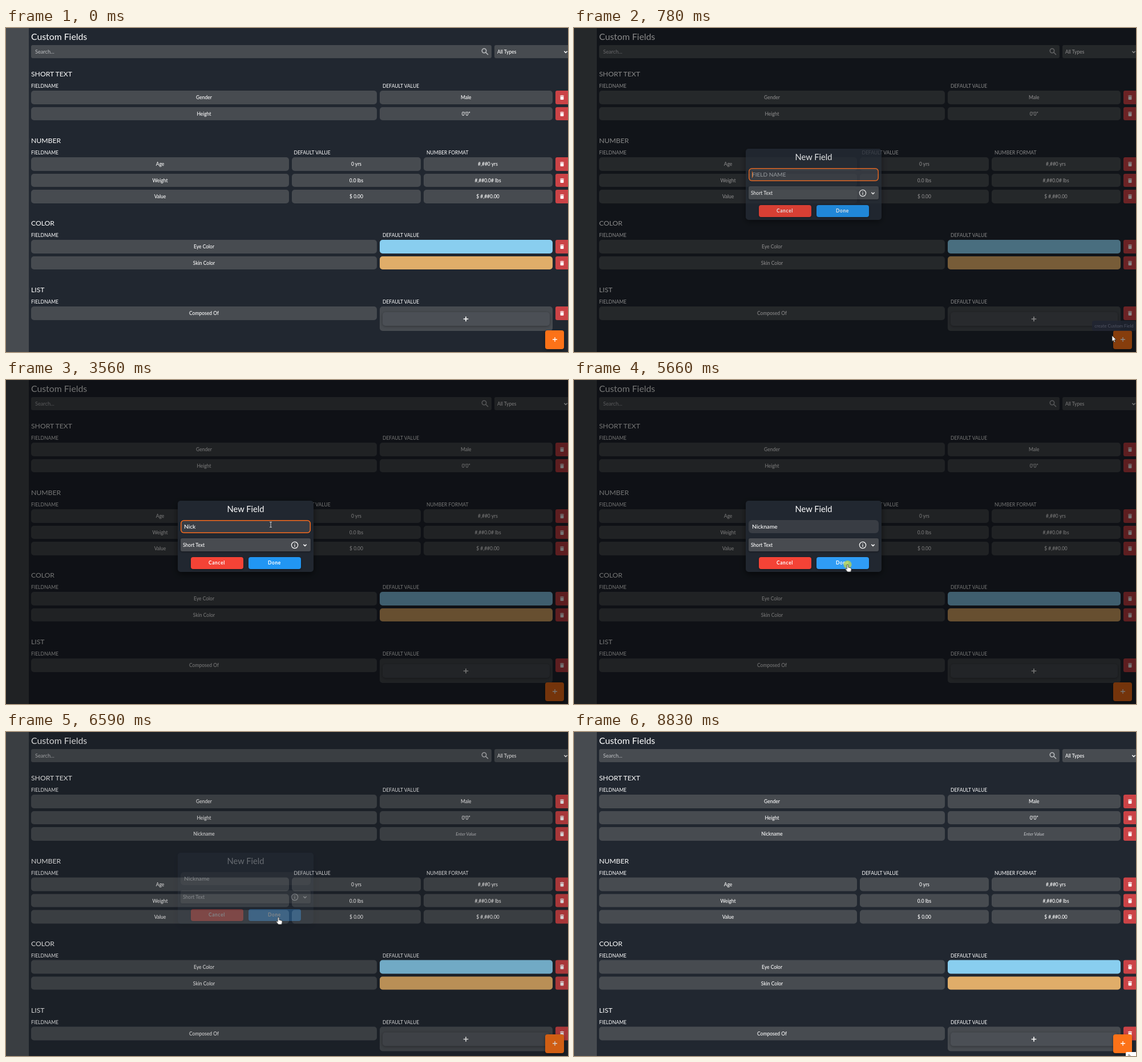
Write an HTML page that moves like this. It is 985 px wide and 569 px high and loops after 8920 ms.

```html
<!DOCTYPE html>
<html lang="en">
<head>
<meta charset="utf-8">
<title>Custom Fields</title>
<style>
  :root { --loop: 8920ms; --bg: #212730; --cell: #474b50; --accent: #fc7218; }
  html, body { margin: 0; width: 100%; height: 100%; overflow: hidden; background: var(--bg); }
  body { font: 500 8.5px Lato, "Open Sans", sans-serif; color: #fff; }
  div, svg { position: absolute; box-sizing: border-box; }
  svg { overflow: visible; fill: none; stroke: #fff; }
  #stage { inset: 0 auto auto 0; width: 985px; height: 569px; overflow: hidden; background: var(--bg); }
  #page, #below, #dialog { inset: 0; }
  .text { line-height: 20px; white-space: pre; }
  .title { font-size: 15.8px; font-weight: 400; }
  .heading { font-size: 12.2px; font-weight: 400; }
  .label { font-weight: 400; }
  .cell, .button, .delete, .center { display: flex; align-items: center; justify-content: center; white-space: pre; }
  .cell { background: var(--cell); border-radius: 5px; }
  .bar { background: var(--cell); border-radius: 3px; }
  .side { background: var(--cell); }
  .delete { background: #cb4346; border-radius: 3px 0 0 3px; }
  .delete svg { position: static; fill: #fff; stroke: none; }
  .empty { font-size: 7.7px; font-style: italic; font-weight: 400; color: #c4c6c9; }
  .add { background: #4b4f55; border-radius: 5px; box-shadow: 0 1px 4px #0005; }
  .fab { background: var(--accent); border-radius: 4px; box-shadow: 0 2px 5px #0006; }
  .tip { background: #3c455e; border-radius: 4px; font-size: 7.8px; font-weight: 400; color: #b0b6d8; }
  .shade { background: #000; opacity: .54; }
  .modal { background: var(--bg); border-radius: 5px; box-shadow: 0 4px 12px #0008; }
  .modal-title { font-size: 14.7px; font-weight: 400; }
  .input { background: #393d44; border-radius: 6px; padding-left: 6px; font-size: 10.1px; line-height: 22px; }
  .placeholder { color: #a6a9ad; font-weight: 400; }
  .caret { display: inline-block; width: 1px; height: 11px; margin-right: -1px; vertical-align: -2px; background: var(--accent); }
  .select { background: #484b50; border-radius: 3px; box-shadow: 0 1px 3px #0006; }
  .button { border-radius: 4px; font-weight: 700; letter-spacing: .6px; box-shadow: 0 1px 3px #0006; }
  .cancel { background: #f44336; }
  .done { background: #2196f3; }
  .corner { background: #fff; border-radius: 2px 0 0; }
  #cursor { left: 0; top: 0; }
  #cursor path { stroke: #222; stroke-width: .8; fill: #fff; stroke-linejoin: round; }

  #dialog, .nick, .corner, .tip, .placeholder, .caret, .input, .done, .fab, #below,
  .hand, .arrow, .beam, .halo { animation: var(--loop) step-end infinite; }
  #dialog { animation-name: dialog; }
  .nick { animation-name: nick; }
  #below { animation-name: below; }
  .corner { animation-name: corner; }
  .tip { animation-name: tip; }
  .placeholder { animation-name: placeholder; }
  .caret { animation-name: caret; }
  .input { animation-name: focus; }
  .done { animation-name: done; }
  .fab { animation-name: fab; }
  .hand { animation-name: hand; }
  .arrow { animation-name: arrow; }
  .beam { animation-name: beam; }
  .halo { animation-name: halo; }
  .letter { animation: letter var(--loop) step-end infinite; }
  #cursor { animation: move var(--loop) linear infinite; }

  @keyframes dialog {
    0%, 74.77%, 100% { opacity: 0; }
    6.83% { opacity: .1; } 7.73% { opacity: .5; } 8.74% { opacity: .87; }
    9.6% { opacity: 1; } 73.87% { opacity: .32; }
  }
  @keyframes nick { 0% { opacity: 0; } 73.09%, 100% { opacity: 1; } }
  @keyframes below { 0% { transform: none; } 73.09%, 100% { transform: translateY(28.5px); } }
  @keyframes corner { 0% { opacity: 0; } 98.99%, 100% { opacity: 1; } }
  @keyframes tip {
    0%, 10.5%, 100% { opacity: 0; }
    6.83% { opacity: .8; } 9.6% { opacity: .4; }
  }
  @keyframes placeholder { 0% { opacity: 1; } 27.8%, 100% { opacity: 0; } }
  @keyframes caret {
    0%, 27.8%, 40.8%, 57.84% { opacity: 1; }
    25.22%, 39.9%, 52.24%, 62.55%, 100% { opacity: 0; }
  }
  @keyframes focus {
    0% { box-shadow: inset 0 0 0 1.5px #f76a1c; }
    62.55%, 100% { box-shadow: none; }
  }
  @keyframes done { 0% { background: #2196f3; } 60%, 100% { background: #2f9cf5; } }
  @keyframes fab {
    0%, 8.74%, 94.5%, 100% { background: var(--accent); }
    1.68%, 91.3% { background: #fd8232; }
  }
  /* The dialog is hidden whenever a letter collapses again. */
  @keyframes letter { 0% { font-size: 10.1px; } 55%, 100% { font-size: 0; } }
  @keyframes hand { 0%, 60%, 91.3% { opacity: 1; } 6.83%, 74.77%, 100% { opacity: 0; } }
  @keyframes arrow { 0%, 14.5%, 60%, 91.3%, 100% { opacity: 0; } 6.83%, 57.3%, 84.9% { opacity: 1; } }
  @keyframes beam { 0%, 57.3%, 84.9%, 100% { opacity: 0; } 14.5%, 74.77% { opacity: 1; } }
  @keyframes halo { 0%, 7.73%, 19.05%, 65.13%, 100% { opacity: 0; } 6.83%, 17.37%, 62.55% { opacity: .75; } }
  @keyframes move {
    0%, 1.67%, 94.51%, 100% { transform: translate(961px, 590px); }
    1.68% { transform: translate(961px, 560px); }
    3.47% { transform: translate(961px, 548px); }
    6.83% { transform: translate(961px, 548px); animation-timing-function: ease-in; }
    8.74% { transform: translate(943px, 540px); animation-timing-function: ease-in-out; }
    15.58%, 55.71% { transform: translate(464px, 254px); animation-timing-function: ease-in-out; }
    61.65%, 68.6% { transform: translate(479.5px, 324px); }
    69.5%, 84.19% { transform: translate(477.5px, 325px); animation-timing-function: ease-in-out; }
    93.61%, 94.5% { transform: translate(961px, 557px); }
  }
</style>
</head>
<body>
<div id="stage">
  <div id="page"><div id="below"></div></div>
  <div id="dialog"></div>
  <svg id="cursor" width="1" height="1">
    <circle class="halo" r="7" fill="#c3d844" stroke="none"/>
    <g class="hand"><path d="M-1.2 .8Q0-.8 1.2 .8V5L5 5.9Q7 6.4 6.7 8.6L5.7 13H-.2L-3.6 8.4Q-3.8 6.8-2.3 7.2L-1.2 8.2Z"/></g>
    <g class="arrow"><path d="M0 0V10.5L2.4 8.3 4 12 5.7 11.2 4.1 7.7H7.4Z"/></g>
    <g class="beam" stroke="#c9cbce"><line y1="-4" y2="4"/><line x1="-2" x2="2" y1="-4.5" y2="-4.5"/><line x1="-2" x2="2" y1="4.5" y2="4.5"/></g>
  </svg>
</div>
<script>
  const LOOP = 8920;
  const page = document.getElementById('page');
  const below = document.getElementById('below');
  const dialog = document.getElementById('dialog');

  function box(parent, cls, x, y, w, h, html = '') {
    const el = document.createElement('div');
    el.className = cls;
    el.style.cssText = `left:${x}px;top:${y}px;width:${w}px;height:${h}px`;
    el.innerHTML = html;
    parent.append(el);
    return el;
  }

  function text(parent, cls, x, middle, content) {
    const el = box(parent, 'text ' + cls, x, middle - 10, 0, 20, content);
    el.style.width = 'auto';
  }

  function icon(parent, x, y, shapes, width = 1.5) {
    parent.insertAdjacentHTML('beforeend',
      `<svg width="1" height="1" style="left:${x}px;top:${y}px" stroke-width="${width}">${shapes}</svg>`);
  }

  const plus = r => `<path d="M${-r} 0H${r}M0 ${-r}V${r}"/>`;
  const chevron = '<path d="M-2.7-1.3L0 1.4 2.7-1.3"/>';
  const trash = '<svg width="7" height="8"><path d="M0 .6H2L2.5 0H4.5L5 .6H7V1.6H0ZM.6 2.2H6.4V7Q6.4 8 5.4 8H1.6Q.6 8 .6 7Z"/></svg>';

  const PAIR = [[44, 606, 44], [655, 302.5, 660]];
  const TRIPLE = [[44, 452, 44], [501, 226, 504.5], [731.5, 226, 737]];
  const LABELS = ['FIELDNAME', 'DEFAULT VALUE', 'NUMBER FORMAT'];

  function row(parent, columns, middle, values) {
    const top = middle - 11.75;
    columns.forEach(([x, w], i) => {
      const value = values[i];
      if (value === '+') {
        box(parent, 'cell', x, top, w, 42.5);
        box(parent, 'add', x + 4.5, top + 10, w - 9, 23.5);
        icon(parent, x + 151.2, top + 21.5, plus(4.3), 1.6);
        return;
      }
      const cell = box(parent, 'cell', x, top, w, 23.5, value);
      if (value === 'Enter Value') cell.classList.add('empty');
      if (value.startsWith('#') && value.length === 7) {
        cell.style.background = value;
        cell.textContent = '';
      }
    });
    box(parent, 'delete', 962.5, top, 23, 23.5, trash);
  }

  function section(parent, middle, name, columns, rows) {
    text(parent, 'heading', 44, middle, name);
    columns.forEach(([, , x], i) => text(parent, 'label', x, middle + 21, LABELS[i]));
    rows.forEach((values, i) => row(parent, columns, middle + 41.2 + i * 28.5, values));
  }

  box(page, 'side', 0, 0, 39.5, 569);
  text(page, 'title', 44, 14.5, 'Custom Fields');
  box(page, 'bar', 44, 29.5, 807, 23.5);
  box(page, 'bar', 856, 29.5, 132, 23.5);
  const search = box(page, 'text', 51, 31.5, 60, 20, 'Search...');
  search.style.cssText += 'font-size:9.2px;font-weight:400;color:#c0c2c5';
  icon(page, 837.5, 39.5, '<g stroke="#b9bbbe"><circle r="3.7"/><path d="M2.8 2.8L7 7"/></g>', 1.6);
  text(page, '', 861, 41.5, 'All Types');
  icon(page, 980.5, 41.5, chevron);

  section(page, 81, 'SHORT TEXT', PAIR, [['Gender', 'Male'], ['Height', '0\'0"']]);
  row(box(page, 'nick', 0, 0, 985, 200), PAIR, 179.2, ['Nickname', 'Enter Value']);
  section(below, 198, 'NUMBER', TRIPLE, [
    ['Age', '0 yrs', '#,##0 yrs'],
    ['Weight', '0.0 lbs', '#,##0.0# lbs'],
    ['Value', '$ 0.00', '$ #,##0.00'],
  ]);
  section(below, 343, 'COLOR', PAIR, [['Eye Color', '#89ceef'], ['Skin Color', '#e0ad69']]);
  section(below, 459.8, 'LIST', PAIR, [['Composed Of', '+']]);

  box(page, 'fab', 945, 530.5, 33, 33);
  icon(page, 961.5, 547, plus(4), 1.3);
  box(page, 'tip center', 908, 514, 77, 18, 'create Custom Field');
  const corner = box(page, 'corner', 966.5, 562, 19, 8);
  icon(corner, 5, 6, '<path stroke="#333" d="M-1 0Q0-2 2-.5L3 1"/>', 1);

  box(dialog, 'shade', 0, 0, 985, 569);
  box(dialog, 'modal', 301, 211.5, 238, 125);
  box(dialog, 'modal-title center', 301, 216, 238, 20, 'New Field');
  const input = box(dialog, 'input', 306, 246, 227.5, 22.5);
  box(input, 'placeholder', 6, 0, 90, 22, 'FIELD NAME');
  const typedAt = [2480, 2780, 2950, 3100, 3640, 3810, 3960, 4110];
  input.insertAdjacentHTML('beforeend', [...'Nickname'].map((letter, i) =>
    `<span class="letter" style="animation-delay:${typedAt[i] - LOOP}ms">${letter}</span>`
  ).join('') + '<span class="caret"></span>');

  box(dialog, 'select', 306, 278, 227.5, 23);
  text(dialog, '', 310, 289.5, 'Short Text');
  icon(dialog, 505.5, 290, '<circle r="5.6"/><path d="M0-.8V3M0-3V-1.8"/>', 1.2);
  icon(dialog, 523.5, 290, chevron);
  box(dialog, 'button cancel', 323.5, 311, 92, 20.5, 'Cancel');
  box(dialog, 'button done', 424.5, 311, 92, 20.5, 'Done');
</script>
</body>
</html>
```
